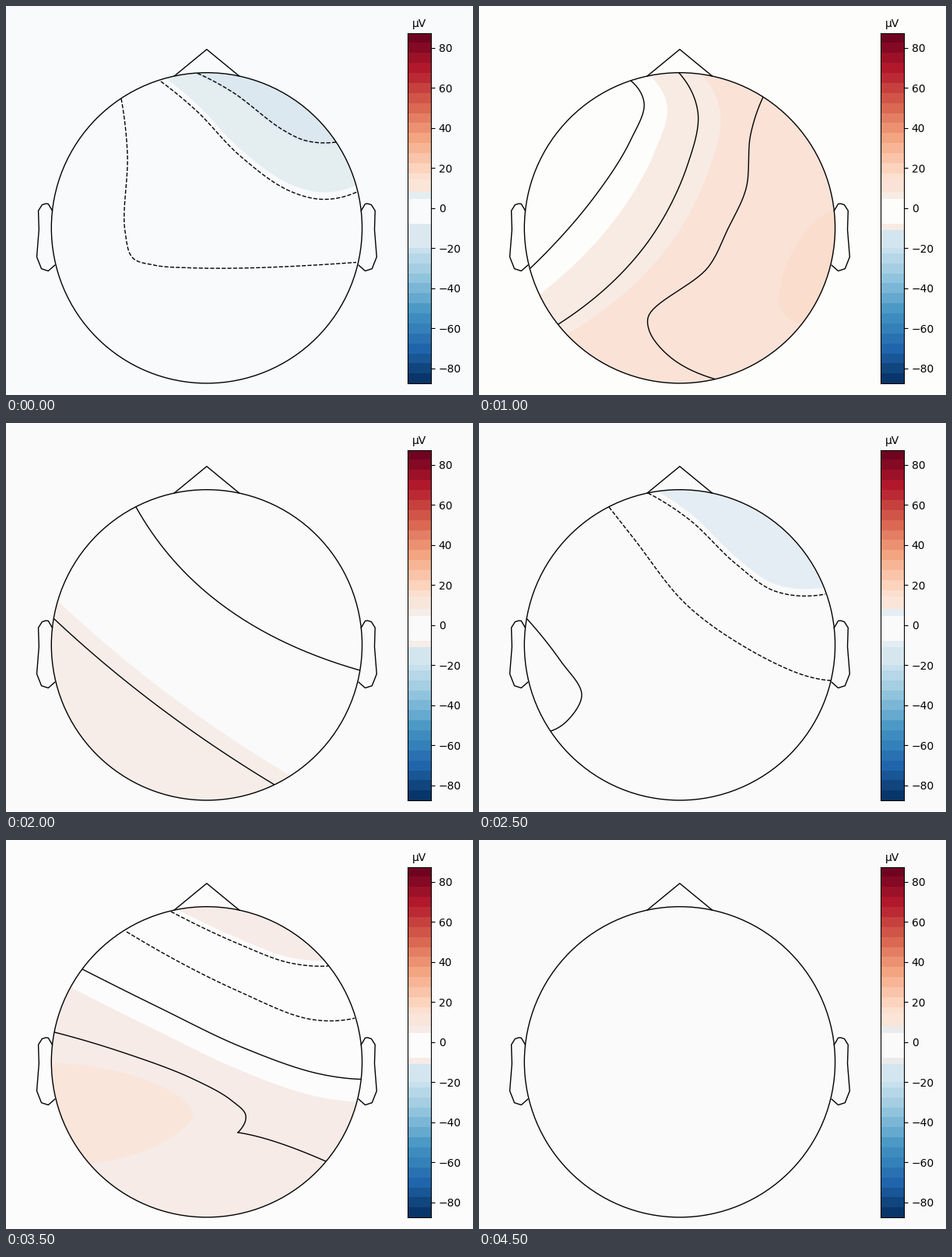
A matplotlib script for the animation above (5000 ms loop, 600 by 500 pixels).

```python
import numpy as np
import matplotlib.pyplot as plt
from matplotlib.animation import FuncAnimation
from matplotlib.patches import Circle, Polygon

W, H, DPI = 600, 500, 100
CX, CY, R = 257.9, 285.3, 199.6
LIMIT = 87.38

plt.rcParams.update({"font.family": "DejaVu Sans", "lines.linewidth": 1})
fig = plt.figure(figsize=(W / DPI, H / DPI), dpi=DPI)
ax = fig.add_axes([0, 0, 1, 1])
ax.set(xlim=(0, W), ylim=(H, 0))
ax.axis("off")
head = Circle((CX, CY), R, fc="none", ec="black", lw=1, zorder=6)
ax.add_patch(head)

bar = fig.add_axes([516 / W, 15.1 / H, 30 / W, 450 / H])
bar.set(xticks=[], xlim=(0, 1), ylim=(-LIMIT, LIMIT))
bar.yaxis.tick_right()
bar.set_title("\u00b5V", fontsize=10)


def pts(*xy):
    return np.array(xy, float).reshape(-1, 2)


def smooth(p, steps=16):
    """Cubic Hermite curve through a few key points."""
    t = np.r_[0, np.cumsum(np.hypot(*np.diff(p, axis=0).T) ** 0.7)]
    m = np.gradient(p, t, axis=0, edge_order=min(2, len(p) - 1))
    u = np.linspace(0, 1, steps, endpoint=False)[:, None]
    parts = []
    for i, d in enumerate(np.diff(t)):
        parts.append((2 * u**3 - 3 * u**2 + 1) * p[i]
                     + (u**3 - 2 * u**2 + u) * d * m[i]
                     + (3 * u**2 - 2 * u**3) * p[i + 1]
                     + (u**3 - u**2) * d * m[i + 1])
    return np.vstack(parts + [p[-1:]])


def extend(c, length=25):
    """Lengthen both ends of a curve along its tangents."""
    def tip(end, inner):
        return end + length * (end - inner) / np.hypot(*(end - inner))
    return np.vstack([tip(c[0], c[1]), c, tip(c[-1], c[-2])])


class Scene:
    """One scalp map: its backdrop, filled zones and contour lines."""

    def __init__(self, bg, warm, near, cool_near=None, cool="#d3e6f0"):
        self.parts = [ax.axhspan(0, H, fc=bg, lw=0, zorder=0)]
        edges = (-20, -11, -8, 4.7, 8, 14.4)
        shades = (cool, cool_near or near, bg, near, warm)
        for lo, hi, color in zip(edges, edges[1:], shades):
            self.parts.append(bar.axhspan(lo, hi, fc=color, lw=0, zorder=2,
                                          antialiased=False))

    def flood(self, color):
        self.parts.append(ax.add_patch(
            Circle((CX, CY), R, fc=color, lw=0, zorder=1)))

    def zone(self, color, side, keys):
        """Fill between a curve and the head's rim; side=1 closes clockwise."""
        c = extend(smooth(keys))
        a0, a1 = np.arctan2(c[[-1, 0], 1] - CY, c[[-1, 0], 0] - CX)
        a = a0 + side * np.linspace(0, (side * (a1 - a0)) % (2 * np.pi), 60)
        rim = np.c_[CX + 1.3 * R * np.cos(a), CY + 1.3 * R * np.sin(a)]
        patch = ax.add_patch(Polygon(np.vstack([c, rim]), fc=color, lw=0,
                                     zorder=2))
        patch.set_clip_path(head)
        self.parts.append(patch)

    def line(self, keys, style="-"):
        curve, = ax.plot(*smooth(keys).T, style, color="black", zorder=5)
        curve.set_clip_path(head)
        self.parts.append(curve)

    def dash(self, keys):
        self.line(keys, "--")

    def show(self, on):
        for part in self.parts:
            part.set_visible(on)


def draw_outline():
    nx, ny = 0.2094 * R, 0.9778 * R
    ax.plot([CX - nx, CX, CX + nx], [CY - ny, CY - 1.15 * R, CY - ny],
            color="black", zorder=6)
    ear = pts(.497, .0555, .510, .0775, .518, .0783, .5299, .0746,
              .5419, .0555, .54, -.0055, .547, -.0932, .532, -.1313,
              .510, -.1384, .489, -.1199) * 2 * R
    for s in (-1, 1):
        ax.plot(CX + s * ear[:, 0], CY - ear[:, 1], color="black", zorder=6)


def draw_colorbar(step=5):
    cmap = plt.get_cmap("RdBu_r")
    for v in np.arange(-85, 86, step):
        bar.axhspan(v - step / 2, v + step / 2, lw=0, zorder=1,
                    fc=cmap(0.5 + v / (2 * LIMIT)), antialiased=False)


def blue_front():
    s = Scene("#f9fafc", "#fbe5d8", "#e4eef1", "#dce8f0", "#dce8f0")
    outer = pts(199, 97, 245, 135, 300, 192, 365, 238, 408, 248.5, 452, 238.5)
    inner = pts(246, 86.5, 290, 110, 357, 160, 385, 173, 424, 175)
    s.zone("#e4eef1", -1, outer - (0, 9))
    s.zone("#dce8f0", -1, inner + (0, 3))
    s.dash(outer)
    s.dash(inner)
    s.dash(pts(148, 119, 156, 190, 153, 290, 163, 324, 190, 333,
               235, 336.5, 450, 329.5))
    return s


def warm_all():
    s = Scene("#fefefe", "#f9e8df", "#f9e8df", "#f8ebe4")
    s.flood("#f8ebe4")
    s.zone("#f9e8df", 1, pts(75, 357, 130, 312, 210, 269, 325, 234,
                             365, 199, 395, 188, 432, 189))
    s.zone("#f8ebe4", 1, pts(95, 400, 160, 450, 310, 478))
    s.line(pts(59, 266.5, 150, 219, 240, 178, 280, 145, 298, 118, 304, 105))
    s.line(pts(304, 105, 320, 96))
    return s


def warm_right():
    s = Scene("#fdfdfb", "#fae2d7", "#f8ebe4")
    left = pts(195, 96, 212, 124, 195, 172, 150, 243, 66, 337)
    mid = pts(257, 86, 281, 135, 268, 204, 212, 310, 102, 409)
    s.zone("#f8ebe4", -1, left + 0.43 * (mid - left))
    s.zone("#fae2d7", -1, mid + (29, 2))
    s.zone("#fbddce", -1, pts(457, 262, 430, 278, 390, 348, 388, 390,
                              412, 408))
    s.line(left)
    s.line(mid)
    s.line(pts(365, 117, 349, 165, 343, 235, 320, 286, 295, 335,
               217, 401, 219, 418, 243, 449, 303, 479.5))
    return s


def warm_corner():
    s = Scene("#fafafa", "#f9e6da", "#f6ede8")
    s.zone("#f6ede8", 1, pts(192, 96, 222, 120, 215, 159, 122, 186, 88, 180))
    s.line(pts(225, 88.5, 268, 117, 289, 180, 281, 213, 235, 229,
               120, 236.5, 68, 223.5))
    return s


def warm_low():
    s = Scene("#fafafa", "#f9e6da", "#f6ede8")
    low = pts(61, 251, 190, 360, 345, 465)
    s.zone("#f6ede8", 1, low + (10, -18))
    s.line(low)
    s.line(pts(167, 108, 265, 224, 455, 318))
    return s


def blue_corner():
    s = Scene("#fafafa", "#fbe5d8", "#e4edf3", cool="#d5e6ee")
    front = pts(217, 90, 270, 124, 330, 181, 380, 216, 445, 220)
    s.zone("#e4edf3", -1, front - (0, 9))
    s.dash(front)
    s.dash(pts(167, 108, 200, 150, 265, 232, 340, 287, 420, 325, 452, 331))
    s.line(pts(61, 251, 105, 306, 132, 350, 112, 384, 92, 396))
    return s


def warm_side():
    s = Scene("#fbfbfb", "#f9e5da", "#f6ebe6")
    front = pts(190, 98, 310, 171, 438, 194)
    s.zone("#f6ebe6", 1, front + (-65, 190))
    s.dash(front)
    s.dash(pts(157, 115, 300, 222, 455, 276))
    s.line(pts(80, 196, 240, 294, 441, 365))
    return s


def warm_back():
    s = Scene("#fcfcfc", "#f9e5da", "#f6ebe6")
    front = pts(212, 92, 300, 134, 365, 158, 414, 162)
    mid = pts(98, 166, 200, 217, 300, 265, 400, 300, 456, 307.5)
    s.zone("#f6ebe6", -1, front - (0, 7))
    s.zone("#f6ebe6", 1, mid + (-4, 29))
    s.zone("#f9e5da", 1, pts(59, 287, 160, 302, 225, 332, 240, 352,
                             220, 377, 108, 416))
    s.dash(front)
    s.dash(pts(155, 118, 300, 195, 395, 231, 448, 229))
    s.line(mid)
    s.line(pts(62, 247, 150, 273, 240, 307, 290, 335, 308, 354, 298, 376))
    s.line(pts(298, 376, 330, 383, 411, 413))
    return s


def warm_fade():
    s = Scene("#fbfbfb", "#f9e5da", "#f6ebe6")
    s.flood("#f6ebe6")
    s.line(pts(66, 232, 240, 294, 445, 359))
    return s


def blank():
    return Scene("#fafafa", "#fbe4d8", "#ebebeb")


draw_outline()
draw_colorbar()
scenes = [make() for make in (blue_front, warm_all, warm_right, warm_corner,
                              warm_low, blue_corner, warm_side, warm_back,
                              warm_fade, blank)]


def update(i):
    for k, scene in enumerate(scenes):
        scene.show(k == i)
    return []


anim = FuncAnimation(fig, update, frames=len(scenes), interval=500,
                     repeat=True, repeat_delay=0, blit=False)
plt.show()
```
